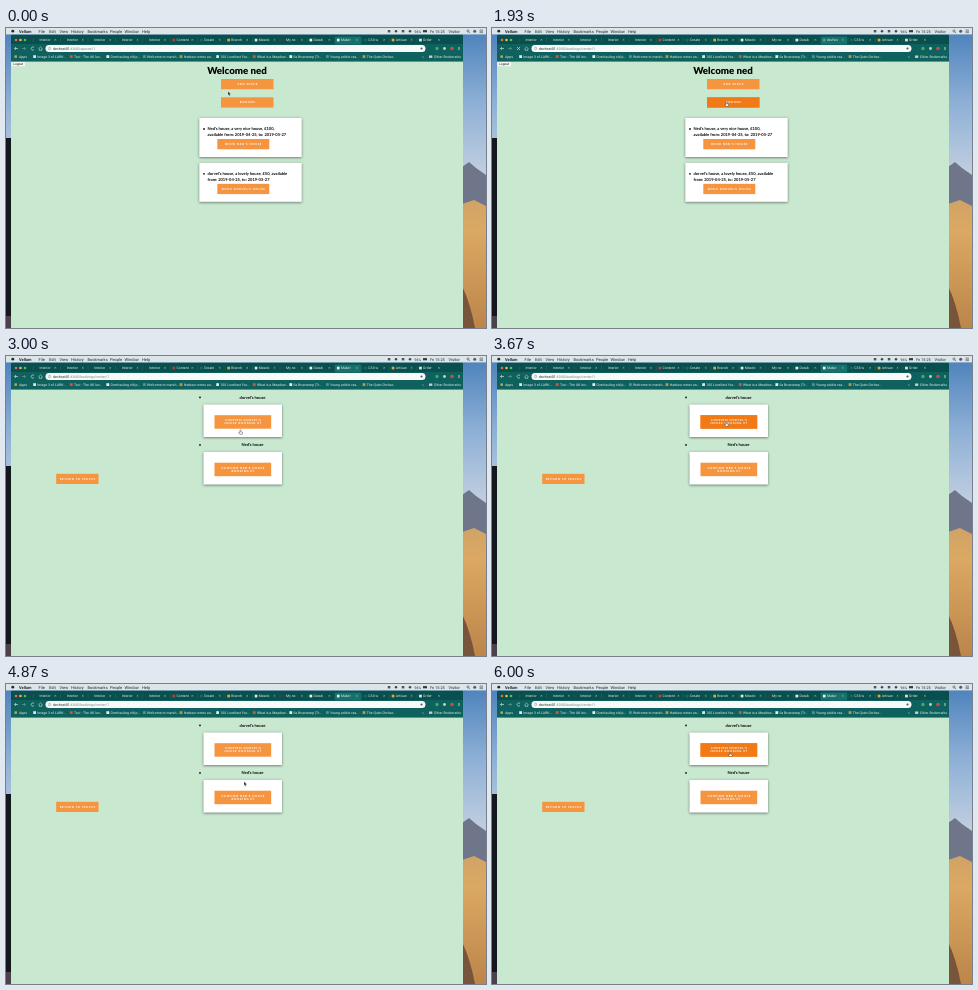
An HTML page that plays this animation: 480 px wide and 300 px high, repeating every 8000 ms.

```html
<!DOCTYPE html>
<html lang="en">
<head>
<meta charset="utf-8">
<title>House bookings</title>
<style>
  html, body { margin: 0; width: 100%; height: 100%; overflow: hidden; background: #c9e8d0; }
  svg { display: block; width: 100vw; height: 100vh; }
  text { white-space: pre; text-rendering: geometricPrecision; }
  .ui { font-family: Roboto, sans-serif; }
  .page { font-family: Lato, sans-serif; font-weight: 700; font-size: 4.05px; fill: #050505; }
  .title { font-weight: 900; font-size: 9.7px; text-anchor: middle; }
  .btn text { font-weight: 700; font-size: 2.8px; letter-spacing: .6px; fill: #fff; text-anchor: middle; }
  .card { fill: #fff; filter: drop-shadow(0 1.6px 1px rgba(0, 0, 0, .34)) drop-shadow(0 .8px 1.8px rgba(0, 0, 0, .18)); }
  .mid { text-anchor: middle; }
</style>
</head>
<body>
<svg id="stage" viewBox="0 0 480 300" preserveAspectRatio="none"></svg>
<script>
const LOOP = 8000;
const stage = document.getElementById('stage');
const $ = id => document.getElementById(id);

const rect = (x, y, w, h, fill, more = '') =>
  `<rect x="${x}" y="${y}" width="${w}" height="${h}" fill="${fill}" ${more}/>`;
const dot = (x, y, r, fill) => `<circle cx="${x}" cy="${y}" r="${r}" fill="${fill}"/>`;
const text = (x, y, s, more = '') => `<text x="${x}" y="${y}" ${more}>${s}</text>`;
const line = (d, color, w = .6, more = '') =>
  `<path d="${d}" fill="none" stroke="${color}" stroke-width="${w}" ${more}/>`;
const card = (x, y, w, h) => `<rect class="card" x="${x}" y="${y}" width="${w}" height="${h}"/>`;

function button(x, y, w, h, lines, id) {
  const cx = x + w / 2 + .3, top = y + h / 2 + .9 - (lines.length - 1) * 1.6;
  const hover = id ? rect(x, y, w, h, '#f17a16', `id="${id}" opacity="0"`) : '';
  return `<g class="btn">${rect(x, y, w, h, '#f6953f')}${hover}` +
    lines.map((s, i) => text(cx, top + i * 3.2, s)).join('') + '</g>';
}

function desktop() {
  return `<defs>
    <linearGradient id="sky" x2="0" y2="1">
      <stop stop-color="#4a80ba"/><stop offset=".5" stop-color="#8eb0d6"/><stop offset="1" stop-color="#c4d0e0"/>
    </linearGradient>
    <linearGradient id="sand" x2="0" y2="1">
      <stop stop-color="#c99e69"/><stop offset=".35" stop-color="#dba963"/><stop offset="1" stop-color="#bd854a"/>
    </linearGradient></defs>` +
    rect(0, 0, 480, 150, 'url(#sky)') + rect(0, 150, 480, 150, 'url(#sand)') +
    '<path d="M456 139L463 134L470 140L480 147V178L468 172L456 176Z" fill="#70768a"/>' +
    '<path d="M456 258Q464 274 469 300H456Z" fill="#77543a"/>' +
    rect(0, 110, 6, 178, '#14171e') + rect(0, 288, 6, 12, '#4c414b');
}

function menuBar() {
  const items = [['File', 32.5], ['Edit', 43], ['View', 53.5], ['History', 65], ['Bookmarks', 81.5],
    ['People', 104], ['Window', 118.5], ['Help', 136]];
  const icons = [383, 390, 397, 404];
  return rect(0, 0, 480, 6.4, '#dce5e8') + '<g class="ui" font-size="4" fill="#20272b">' +
    dot(6.8, 3.2, 1.4, '#22282c') + text(13, 4.6, 'Vellum', 'font-weight="700"') +
    items.map(([s, x]) => text(x, 4.6, s)).join('') +
    icons.map((x, i) => i % 2 ? dot(x, 3.2, 1.2, '#3c454a') : rect(x - 1.2, 2, 2.5, 2.4, '#4a5358')).join('') +
    text(408.5, 4.5, '96%', 'font-size="3.5"') + rect(417, 2.1, 4, 2.2, '#333b40') +
    text(424, 4.6, 'Fri 15:25', 'font-size="3.8"') + text(442.5, 4.6, 'Visitor') +
    '<circle cx="462" cy="3" r="1.1" fill="none" stroke="#333" stroke-width=".5"/>' +
    line('M462.8 3.8L464 5', '#333', .5) + dot(468.7, 3.2, 1.5, '#5a5672') +
    line('M473.5 2H477M473.5 3.3H477M473.5 4.6H477', '#333', .5) + '</g>';
}

function tabs() {
  const names = ['Interior', 'Interior', 'Interior', 'Interior', 'Interior', 'Content', 'Create',
    'Branch', 'Meado', 'My no', 'Datab', 'Maker', 'CSS w', 'Artisan', 'Order'];
  const tints = ['#17696a', '#e0a344', '#dde8e6', '#284a52', '#e8efef', '#b74442'];
  return names.map((s, i) => {
    const x = 27.3 + i * 27.4, on = i === 11;
    return (on ? rect(x, 8.4, 26.5, 8, '#17706c', 'rx="1"') : line(`M${x} 10V14`, '#3e7977', .35)) +
      (i > 4 ? rect(x + 2.2, 10.7, 2.7, 2.7, on ? '#e8f2ee' : tints[i % 6], on ? 'id="favicon"' : '') : '') +
      text(x + 6.2, 13.3, s, on ? 'id="tab"' : '') +
      line(`M${x + 21.2} 11l1.7 1.7m0-1.7l-1.7 1.7`, '#c6dad7', .4);
  }).join('');
}

function bookmarks() {
  const names = ['Image 3 of LARK…', 'Tovi - The UK loc…', 'Overhauling old p…', 'Welcome to marsh…', 'Harbour notes an…',
    '100 Loveliest Yar…', 'What is a Meadow…', 'Ila Brunsteep (Tr…', 'Young adults rea…', 'The Quiet Orchar…'];
  const tints = ['#dce7e5', '#ce554a', '#e7ecea', '#3d9c90', '#c69142'];
  return text(13, 30.1, 'Apps') + rect(8.5, 27.4, 2.4, 2.4, '#d2a554') +
    names.map((s, i) => {
      const x = 31.3 + i * 36.6;
      return text(x, 30.1, s) + rect(x - 4.1, 27.2, 2.8, 2.8, tints[i % 5]);
    }).join('') +
    text(416, 30.1, '»') + rect(423, 27.5, 3.3, 2.4, '#bdd1ce') + text(428, 30.1, 'Other Bookmarks');
}

function browser() {
  const ink = '#e2eeeb';
  return rect(5, 6.4, 452, 27.4, '#084f4d', 'rx="1"') + rect(5, 16, 452, 17.8, '#0f615e') +
    `<g class="ui" font-size="3.5" fill="${ink}">` +
    dot(10, 12, 1.3, '#e9655a') + dot(14.5, 12, 1.3, '#e6b94c') + dot(19, 12, 1.3, '#58bb57') + tabs() +
    line('M12 20.5H8.5M10 19L8.5 20.5L10 22', ink) + line('M16 20.5H19.5M18 19L19.5 20.5L18 22', '#72a19d') +
    line('M28 19.5A1.6 1.6 0 1 0 28 21.6', ink, .6, 'id="reload"') +
    line('M25 19L28 22M28 19L25 22', ink, .6, 'id="stop"') +
    line('M32.5 20.8L34.5 19L36.5 20.8M33.2 20.6V22.3H35.8V20.6', ink, .5) +
    rect(39.5, 16.9, 380, 7.2, '#f7faf9', 'rx="3.6"') +
    '<circle cx="43.6" cy="20.5" r="1.2" fill="none" stroke="#687472" stroke-width=".45"/>' +
    text(47, 21.8, 'devhost01<tspan fill="#7d8785" id="path"></tspan>', 'font-size="3.6" fill="#22292a"') +
    dot(415.5, 20.5, 1.1, '#56615f') + dot(431, 20.5, 1.7, '#45a866') + dot(438.5, 20.5, 1.4, '#c3d5d2') +
    dot(446, 20.5, 1.8, '#bd5147') + line('M453 19V22', ink, .8) + bookmarks() + '</g>' +
    rect(5, 33.6, 452, 266.4, '#c9e8d0');
}

function houseCard(y, lines, label) {
  return card(193.3, y, 102.4, 39) + dot(198, y + 11, .9, '#111') +
    lines.map((s, i) => text(201.5, y + 12.3 + i * 5.4, s)).join('') + button(211.3, y + 21, 52, 10.3, [label]);
}

const homePage = () => '<g id="home" class="page">' +
  rect(5.5, 34, 13.5, 4.2, '#f4f6f4', 'rx=".7"') +
  text(12.2, 37.2, 'Logout', 'class="ui mid" font-weight="400" style="font-size:3.2px"') +
  text(231, 46.4, 'Welcome ned', 'class="title"') +
  button(215, 51, 52.5, 10.3, ['ADD SPACE']) + button(215, 69.3, 52.5, 10.3, ['BOOKED'], 'hot0') +
  houseCard(90, ['Ned’s house, a very nice house, £100,', 'available from: 2019-04-25, to: 2019-05-27'], 'BOOK NED’S HOUSE') +
  houseCard(134.8, ['dorvel’s house, a lovely house, £50, available', 'from: 2019-04-25, to: 2019-05-27'], 'BOOK DORVEL’S HOUSE') +
  '</g>';

const request = (y, name, n, lines) =>
  dot(194, y - 7.1, .9, '#111') + text(246.5, y - 5.9, `${name}’s house`, 'class="mid"') +
  `<g id="box${n}">${card(197.5, y, 78.5, 32.5)}<g class="fade">` +
  button(208.5, y + 10.7, 56.7, 13.5, lines, 'hot' + n) + '</g></g>';

const bookingPage = () => '<g id="bookings" class="page">' +
  request(48.5, 'dorvel', 1, ['CONFIRM DORVEL’S', 'HOUSE BOOKING #7']) +
  request(96, 'Ned', 2, ['CONFIRM NED’S HOUSE', 'BOOKING #7']) +
  `<g id="box3"><g class="fade">${button(50.2, 117.8, 42.3, 10.2, ['RETURN TO SPACES'])}</g></g></g>`;

const cursor = () => '<g id="cursor" stroke-linejoin="round">' +
  '<path id="arrow" d="M0 0V4.2L1 3.3L1.7 4.9L2.4 4.6L1.7 3.1H3Z" fill="#111" stroke="#fff" stroke-width=".35"/>' +
  '<path id="hand" d="M-.5.4Q0-.2.5.4V2L2 2.4Q2.4 3 2 4.6H-.6L-1.7 3Q-1.5 2.3-.5 3Z" fill="#fff" stroke="#222" stroke-width=".4"/></g>';

stage.innerHTML = desktop() + browser() + menuBar() + homePage() + bookingPage() + cursor();

// time, x, y, hand shown from here on
const route = [
  [70, 222, 63.3, 0], [330, 230, 70, 1], [540, 234, 73, 1], [1800, 234, 73, 1], [1930, 234.4, 73.7, 1],
  [3330, 234.4, 73.7, 1], [3600, 234.2, 65.7, 1], [4470, 234.2, 65.7, 1], [4530, 234.5, 68.5, 1],
  [4670, 234.5, 68.5, 0], [4870, 238, 97.5, 0], [4970, 239, 111, 1], [5130, 238, 70, 1],
  [5200, 250, 52, 0], [5290, 261, 31, 0], [5400, 246, 62, 1], [5530, 240, 78, 0],
  [5670, 239, 111, 1], [5770, 239, 106, 0], [5940, 238, 68, 1]
];

// time and strength of each hover tint
const hovers = [
  [[330, 0], [560, 1]],
  [[3380, 0], [3640, 1], [4670, 1], [4840, 0], [5070, 0], [5140, .7], [5260, 0], [5400, 0], [5460, .5], [5560, 0], [5800, 0], [5990, 1]],
  [[4930, 0], [5020, .8], [5150, 0], [5610, 0], [5690, .8], [5840, 0]]
];

function between(keys, t, ease = k => k) {
  const i = keys.findIndex(k => k[0] > t);
  if (i === 0) return keys[0].slice(1);
  if (i < 0) return keys[keys.length - 1].slice(1);
  const a = keys[i - 1], b = keys[i], k = ease((t - a[0]) / (b[0] - a[0]));
  return a.slice(1).map((v, n) => v + (b[n + 1] - v) * k);
}

const smooth = k => k * k * (3 - 2 * k);
const show = (id, on) => { $(id).style.display = on ? '' : 'none'; };
// centre x, centre y and starting drop of each box that grows in
const centres = [[236.7, 64.7, 0], [236.7, 112.2, -1.9], [71.3, 122.9, -2]];
const fades = document.querySelectorAll('.fade');

function draw(t) {
  const loading = t >= 1800 && t < 2070, arrived = t >= 2070;
  show('home', !arrived);
  show('bookings', arrived);
  show('reload', !loading);
  show('stop', loading);
  $('path').textContent = t < 1800 ? ':4040/spaces/1' : ':4040/bookings/renter/1';
  $('tab').textContent = loading ? 'devhos' : 'Maker';
  $('favicon').setAttribute('fill', loading ? '#5b9995' : '#e8f2ee');

  const p = Math.min(1, Math.max(0, (t - 2050) / 220)), s = .93 + .07 * p;
  centres.forEach(([x, y, dy], i) =>
    $('box' + (i + 1)).setAttribute('transform', `translate(${x} ${y + dy * (1 - p)}) scale(${s}) translate(${-x} ${-y})`));
  fades.forEach(g => g.setAttribute('opacity', .74 + .26 * p));

  hovers.forEach((keys, i) => $('hot' + i).setAttribute('opacity', between(keys, t)[0]));

  const [x, y] = between(route, t, smooth);
  const hand = (route.filter(k => k[0] <= t).pop() || route[0])[3];
  $('cursor').setAttribute('transform', `translate(${x} ${y})`);
  show('hand', hand);
  show('arrow', !hand);
}

const start = performance.now();
function tick() {
  draw((performance.now() - start) % LOOP);
  requestAnimationFrame(tick);
}
tick();
</script>
</body>
</html>
```
